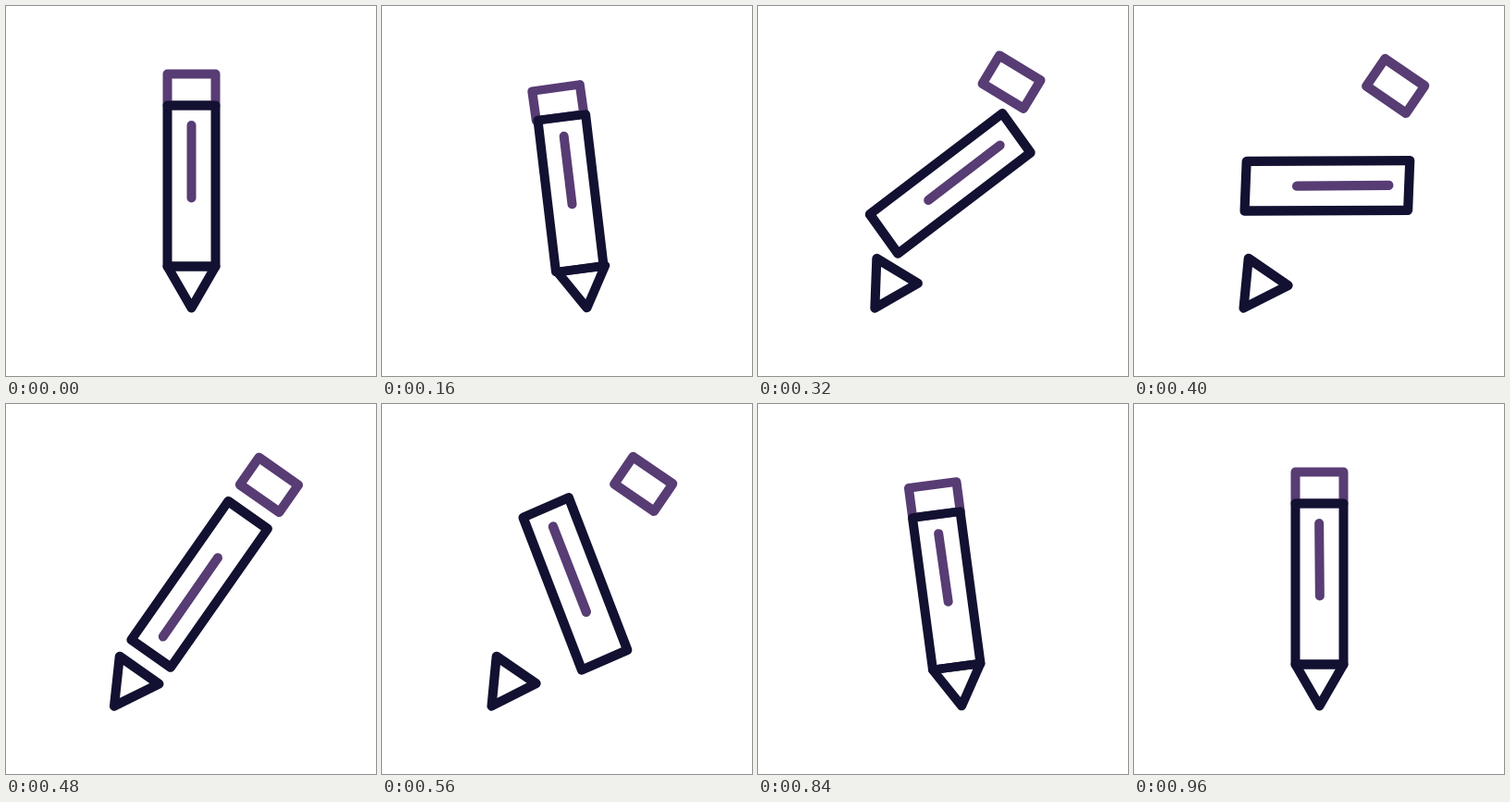
Animation of 400 by 400 pixels, one loop 1.04 s. Source, as an HTML page:

```html
<!DOCTYPE html>
<html lang="en">
<head>
<meta charset="utf-8">
<title>Pencil</title>
<style>
  html, body { margin: 0; width: 100%; height: 100%; overflow: hidden; background: #fff; }
  svg { display: block; width: 100vw; height: 100vh; }
  g { fill: none; stroke: #121131; stroke-width: 10; stroke-linecap: round; stroke-linejoin: round; }
  .accent { stroke: #583c74; }
</style>
</head>
<body>
<svg viewBox="0 0 400 400">
  <g id="pencil">
    <rect id="cap" class="accent" x="-26" y="-253" width="52" height="34"/>
    <path id="tip" d="M-26 -45H26L0 0Z"/>
    <g id="body">
      <rect x="-26" y="-87" width="52" height="174"/>
      <line id="groove" class="accent" y1="-65.5"/>
    </g>
  </g>
</svg>
<script>
const LOOP = 1040, ACTIVE = 960, STEP = 40;
const el = id => document.getElementById(id);
const pencil = el('pencil'), cap = el('cap'), body = el('body'), groove = el('groove');

const clamp = v => Math.min(1, Math.max(0, v));
const span = (t, from, to) => clamp((t - from) / (to - from));
const mix = (a, b, p) => a + (b - a) * p;

function bezier(x1, y1, x2, y2) {
  const at = (a, b, s) => 3 * a * s * (1 - s) ** 2 + 3 * b * s * s * (1 - s) + s ** 3;
  return x => {
    if (x <= 0 || x >= 1) return clamp(x);
    let lo = 0, hi = 1;
    for (let i = 0; i < 30; i++) {
      const mid = (lo + hi) / 2;
      if (at(x1, x2, mid) < x) lo = mid; else hi = mid;
    }
    return at(y1, y2, lo);
  };
}

const burst = bezier(0.2, 0.85, 0.45, 1);
const whirl = bezier(0.845, 0, 0.155, 1);
const settle = u => 1 - (1 - u) ** 2;

function draw(t) {
  // The pose runs forward to the middle, then back; only the spin keeps going.
  const half = ACTIVE / 2 - Math.abs(t - ACTIVE / 2);
  const wind = settle(span(half, 0, 160));
  const open = burst(span(half, 160, 480));

  const x = mix(21 * wind, -83.5, open);
  const angle = mix(-8 * wind, 35, open);
  const stretch = mix(1 - 0.05 * wind, 1.05, open);
  const gap = 21 * open;
  const spin = 360 * whirl(span(t, 100, 860));
  const grow = 20 * burst(span(half, 240, 480));
  const lean = 0.35 * t / ACTIVE;

  pencil.setAttribute('transform',
    `translate(${200.5 + x} 326.5) rotate(${angle}) scale(1 ${stretch})`);
  cap.setAttribute('transform', `translate(0 ${-2 * gap})`);
  body.setAttribute('transform', `translate(0 ${-132 - gap}) rotate(${spin})`);
  groove.setAttribute('x1', -lean);
  groove.setAttribute('x2', lean);
  groove.setAttribute('y2', 13 + grow);
}

const start = performance.now();
function tick() {
  const t = (performance.now() - start) % LOOP;
  draw(Math.min(ACTIVE, Math.floor(t / STEP) * STEP));
  requestAnimationFrame(tick);
}
tick();
</script>
</body>
</html>
```
